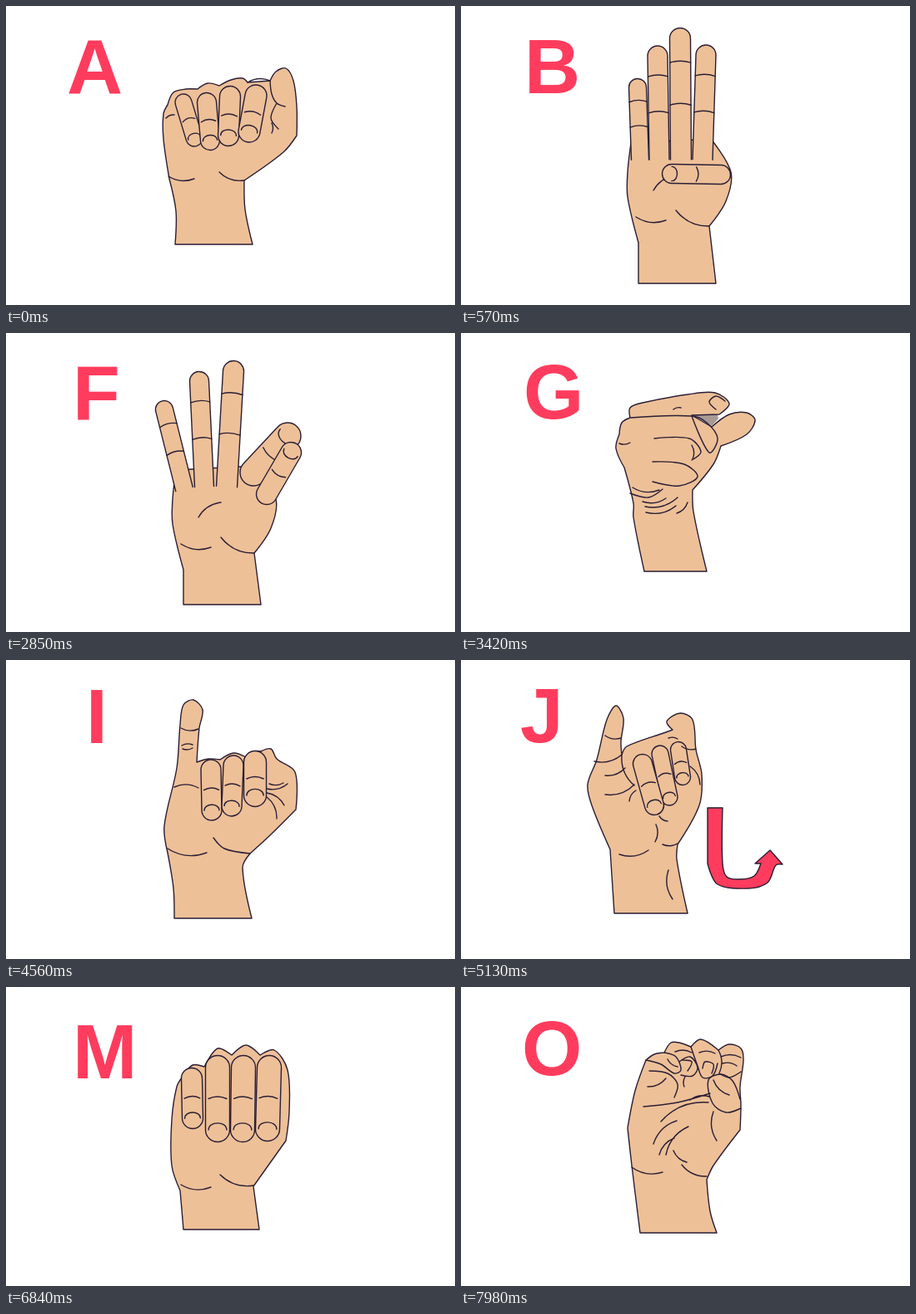
These frames come from a looping animation (539x360 px, 8000 ms). An HTML page:

```html
<!DOCTYPE html>
<html lang="en">
<head>
<meta charset="utf-8">
<title>Finger alphabet</title>
<style>
html, body { margin: 0; width: 100%; height: 100%; overflow: hidden; background: #fff; }
svg { display: block; width: 100%; height: 100%; }
path { fill: #edc098; stroke: #2a1e35; stroke-width: 1.4; stroke-linejoin: round; stroke-linecap: round; }
.line { fill: none; }
.red { fill: #ff3c5d; }
.shade { fill: #a99a96; stroke: none; }
text { font: bold 93px "Liberation Sans", Arial, sans-serif; fill: #ff3c5d; }
</style>
</head>
<body>
<svg id="stage" viewBox="0 0 539 360"></svg>
<script>
const LOOP = 8000, STEP = 570;
const path = (d, kind = '') => `<path class="${kind}" d="${d}"/>`;

const parse = s => {
  const n = s.trim().split(/\s+/).map(Number);
  return n.filter((_, i) => i % 2 === 0).map((x, i) => [x, n[2 * i + 1]]);
};
const dist = (a, b) => Math.hypot(b[0] - a[0], b[1] - a[1]);

// Smooth run through the points
function spline(p) {
  const slope = p.map((_, i) => {
    const a = p[i - 1], b = p[i + 1];
    if (!a || !b) return [0, 0];
    const len = dist(a, p[i]) + dist(p[i], b);
    return [(b[0] - a[0]) / len, (b[1] - a[1]) / len];
  });
  let d = '';
  for (let i = 1; i < p.length; i++) {
    const a = p[i - 1], b = p[i], k = dist(a, b) / 3;
    d += 'C' + a.map((v, j) => v + slope[i - 1][j] * k) + ' ' +
      b.map((v, j) => v - slope[i][j] * k) + ' ' + b;
  }
  return d;
}

// Closed shape; a bar marks a corner
function body(s, kind) {
  let last, d = '';
  for (const run of s.split('|').map(parse)) {
    d += last ? spline([last, ...run]) : 'M' + run[0] + spline(run);
    last = run[run.length - 1];
  }
  return path(d + 'Z', kind);
}

// Skin folds; a stroke of two points bows to its left
const lines = s => path(s.split(';').map(part => {
  const p = parse(part), [a, b] = p;
  if (p.length > 2) return 'M' + a + spline(p);
  const cx = (a[0] + b[0]) / 2 + (b[1] - a[1]) / 4;
  const cy = (a[1] + b[1]) / 2 - (b[0] - a[0]) / 4;
  return `M${a}Q${cx} ${cy} ${b}`;
}).join(''), 'line');

// Places points along (t, in px past the base) and across (s) a finger
function axis(x0, y0, x1, y1) {
  const len = Math.hypot(x1 - x0, y1 - y0), u = (x1 - x0) / len, v = (y1 - y0) / len;
  return { len, at: (t, s) => `${x0 + u * t - v * s} ${y0 + v * t + u * s} ` };
}

// Finger folded towards the viewer, with nail and crease
function fold(x0, y0, x1, y1, w) {
  const { len, at } = axis(x0, y0, x1, y1), r = w / 2, n = r * 0.75, mid = len / 2;
  return path(`M${at(0, r)}A${r} ${r} 0 0 1 ${at(0, -r)}L${at(len, -r)}A${r} ${r} 0 0 1 ${at(len, r)}Z`) +
    path(`M${at(len, n)}C${at(len - n, n)}${at(len - n, -n)}${at(len, -n)}` +
      `M${at(mid, n)}Q${at(mid - 5, 0)}${at(mid, -n)}`, 'line');
}

// Stretched finger, open at the base
function finger(x0, y0, x1, y1, w) {
  const { len, at } = axis(x0, y0, x1, y1), r = w / 2;
  const crease = t => `M${at(len * t, r)}Q${at(len * t + 4, 0)}${at(len * t, -r)}`;
  return path(`M${at(0, -r)}L${at(len, -r)}A${r} ${r} 0 0 1 ${at(len, r)}L${at(0, r)}`) +
    path(crease(0.45) + crease(0.8), 'line');
}

const fist = () =>
  body('213 292 209 245|199 215 199 160 205 120 212 108|224 94 238 96|254 74 271 82|288 70 305 82|322 76 338 100 340 150 336 185|297 240|304 292') +
  lines('246 241 210 238;297 239 257 226');

const knuckles = (...tips) => tips.map((y, i) =>
  fold(223 + 31 * i, i ? 97 : 110, 224 + 30 * i, y, i ? 29 : 25)).join('');

const palm = bottom =>
  body(`213 ${bottom} 213 285|200 230 200 200 204 165|300 160|324 200 318 235 298 265|306 ${bottom}`) +
  lines('246 258 210 254;298 265 258 246;231 222 258 204');

const stage = document.getElementById('stage');
const signs = [];

function sign(letter, x, y, ...parts) {
  const g = document.createElementNS(stage.namespaceURI, 'g');
  g.innerHTML = `<text x="${x}" y="${y}">${letter}</text>` + parts.join('');
  stage.append(g);
  signs.push(g);
}

sign('A', 73, 105,
  body('203 287 204 247 196 208|189 160 189 130 194 119|201 104 216 100 230 100|242 93 256 96|270 89 284 87 290 92|317 90|324 79 336 75 345 90 349 121 349 156|333 176 286 210|287 245 296 287'),
  fold(213, 116, 226, 159, 20), fold(241, 116, 245, 162, 23),
  fold(269, 109, 267, 156, 25), fold(300, 108, 292, 151, 26),
  lines('192 135 202 131;290 92 317 90;317 90 319 106 325 117 335 121;327 148 318 135 325 117;319 141 319 153;226 208 195 205;286 210 256 200'));

sign('B', 76, 105, palm(334),
  finger(215, 185, 212, 98, 21), finger(238, 185, 236, 60, 24),
  finger(264, 185, 263, 39, 25), finger(290, 185, 294, 59, 24),
  fold(312, 203, 253, 202, 23));

sign('C', 74, 105,
  body('213 304 208 258|185 212 183 181 198 120 225 91 270 65 318 57 349 70 354 92 325 96 290 100 275 130 285 168|310 172 335 158 350 173 298 223|286 245 297 304'),
  lines('253 75 282 74 306 92;232 86 262 92 279 116;337 97 340 75;341 178 335 158;275 204 275 170;206 157 238 150;245 252 208 249;288 240 252 237'));

sign('D', 76, 106,
  body('211 329 210 284|199 230 196 185 207 137|211 122 228 118|237 104 250 104 263 110|270 98 285 97 296 112 296 120|308 93 314 63 318 37 330 30 342 38 343 55 334 115 324 171|329 200 298 257 293 269|304 329'),
  lines('207 137 230 143 243 138 241 124 228 118;236 134 228 130 236 126;234 148 209 160;205 182 236 175 254 160 244 152;237 119 258 118;244 140 246 130 258 129 268 140 262 150 250 149 244 140;263 108 267 131;267 119 291 116;270 138 278 131 288 139 283 149 272 148;296 120 290 128 293 140;274 150 258 157'),
  lines('324 171 313 152 298 142 281 143 280 158 304 184 290 194 306 222;302 155 293 149 287 158 304 169;314 68 333 70;313 88 326 89;328 92 314 93;323 130 303 123;233 197 263 173;264 204 285 186;232 220 245 198;244 231 253 216;238 261 203 256;293 269 266 264 256 252'));

sign('E', 74, 105, fist(), knuckles(142, 141, 139, 136),
  fold(318, 176, 254, 171, 24));

sign('F', 80, 104, palm(327),
  finger(214, 188, 190, 92, 21), finger(238, 185, 232, 58, 23),
  finger(265, 185, 273, 46, 25),
  fold(297, 168, 338, 124, 32), fold(313, 194, 342, 144, 25));

sign('G', 75, 103,
  body('279 99|308 98|309 103|301 112', 'shade'),
  body('220 287 207 222 207 205 196 162|186 139 190 122|193 108 203 102|203 90 218 84 272 74 305 72 322 85 310 98|277 99|301 113|322 98 343 96 353 105 343 122 312 136|303 158 278 189|279 215 295 287'),
  lines('204 102 277 100 295 108 308 127 298 144 277 100;232 127 274 127 288 143 277 153;230 155 268 158 284 173 262 184 230 179;277 135 278 152;238 189 206 186;242 188 225 198 203 193;246 199 218 203;260 198 221 209;258 208 222 216;272 204 259 217;203 132 190 133;306 92 298 83 306 76 317 82;255 92 264 90'));

sign('H', 74, 102,
  body('214 288 198 200|186 160 179 130 196 97|230 83 338 72 354 82 345 94|360 105 350 118 302 124|304 150 278 195|279 220 290 288'),
  lines('200 100 345 94;230 122 302 124;227 147 279 148 290 163 280 177 225 174;299 126 286 150;344 78 334 90;354 101 344 117;202 132 183 132;234 193 198 190;251 199 212 207;258 207 217 218'));

sign('I', 96, 100,
  body('202 311 201 275 194 232|190 200 205 130 209 78 213 54 225 48 236 60 232 82 229 123|243 119 257 120|273 112 288 117|297 110 306 110|318 107 325 119 347 135 348 180|317 211 293 233|284 250 295 311'),
  fold(246, 132, 247, 181, 24), fold(273, 127, 271, 176, 24), fold(299, 123, 299, 163, 27),
  lines('231 83 210 82;211 103 224 102;224 106 212 107;202 153 231 154;333 148 316 149;338 149 313 155;313 160 334 175;313 165 325 191;241 232 194 227;293 233 262 227 249 214'));

sign('J', 71, 99,
  body('184 305 179 228|157 175 152 150 163 120 175 72 186 55 195 70 192 98 193 114|199 104 246 87 254 84|247 74 263 64 278 72 282 108 289 138 286 175 260 222|259 240 272 305'),
  fold(261, 108, 266, 141, 19), fold(239, 113, 250, 165, 20), fold(218, 125, 232, 175, 23),
  lines('192 94 173 91;193 114 160 122;208 151 193 114;197 130 173 139;208 150 173 162;202 170 210 157;248 194 238 188;234 198 233 219;260 221 242 222;225 229 190 234;254 288 249 253;275 128 287 150;282 107 265 104;249 94 260 95'),
  body('296 178|314 178|314 245 319 261 335 264 352 260 360 245|353 245|371 229|386 246|378 247 368 268 345 275 308 270 296 245', 'red'));

sign('K', 86, 100, palm(335),
  finger(246, 190, 228, 52, 25), finger(289, 185, 311, 38, 25),
  fold(213, 172, 219, 205, 24), fold(236, 172, 241, 208, 24), fold(304, 200, 271, 150, 25));

sign('L', 88, 101,
  body('184 331 181 282|172 250 159 195|152 165 158 153 173 150|186 140 205 139|222 126 241 118|241 62 239 45 253 28 268 55 272 90 276 150 298 176|333 155 360 145 378 144 386 152 359 172 325 200 266 247|261 256 279 331'),
  fold(242, 136, 248, 181, 23), fold(217, 153, 231, 196, 22), fold(192, 165, 213, 203, 21),
  lines('269 59 243 65;246 92 268 88;268 93 246 92;256 125 266 126;277 155 262 155;161 184 186 184;185 187 166 171;177 217 172 200;195 222 205 209;258 190 273 184;346 168 335 154;334 193 320 179;294 182 304 208;204 253 173 251;266 247 234 251;237 308 226 268'));

sign('M', 80, 110, fist(), knuckles(158, 172, 172, 171));

sign('N', 81, 110, fist(), knuckles(150, 154, 174, 172));

sign('O', 73, 106,
  body('215 296 205 215 200 170|209 125 222 88|232 81 244 79|252 67 262 67 276 72|288 63 309 76|322 69 336 74 339 88 335 120 336 142 335 172|303 215 295 232|299 270 307 296'),
  lines('222 88 240 93 256 104 264 100 258 84 244 79;260 96 248 87;226 101 248 104 260 117 256 133;246 110 224 120;262 90 275 84 284 97 278 107 264 106;266 88 277 90 272 101;257 78 277 79;276 72 284 95 290 109 302 107 308 92;290 98 293 90 303 93 301 104;286 79 305 80;309 76 310 104;336 102 322 109 310 104;312 84 336 85;314 92 331 95'),
  lines('335 135 326 113 312 105 297 112 302 140 318 151 336 146;322 130 303 112;307 185 303 150;219 144 260 139 299 128;240 162 297 139;268 120 269 108;275 136 298 132;231 189 259 161;238 202 256 182;246 202 273 168;271 211 255 197;242 223 205 217;295 228 265 214'));

function draw(time) {
  const now = Math.floor(time % LOOP / STEP);
  signs.forEach((g, i) => { g.style.display = i === now ? '' : 'none'; });
}

draw(0);
let start;
requestAnimationFrame(function tick(now) {
  start ??= now;
  draw(now - start);
  requestAnimationFrame(tick);
});
</script>
</body>
</html>
```
